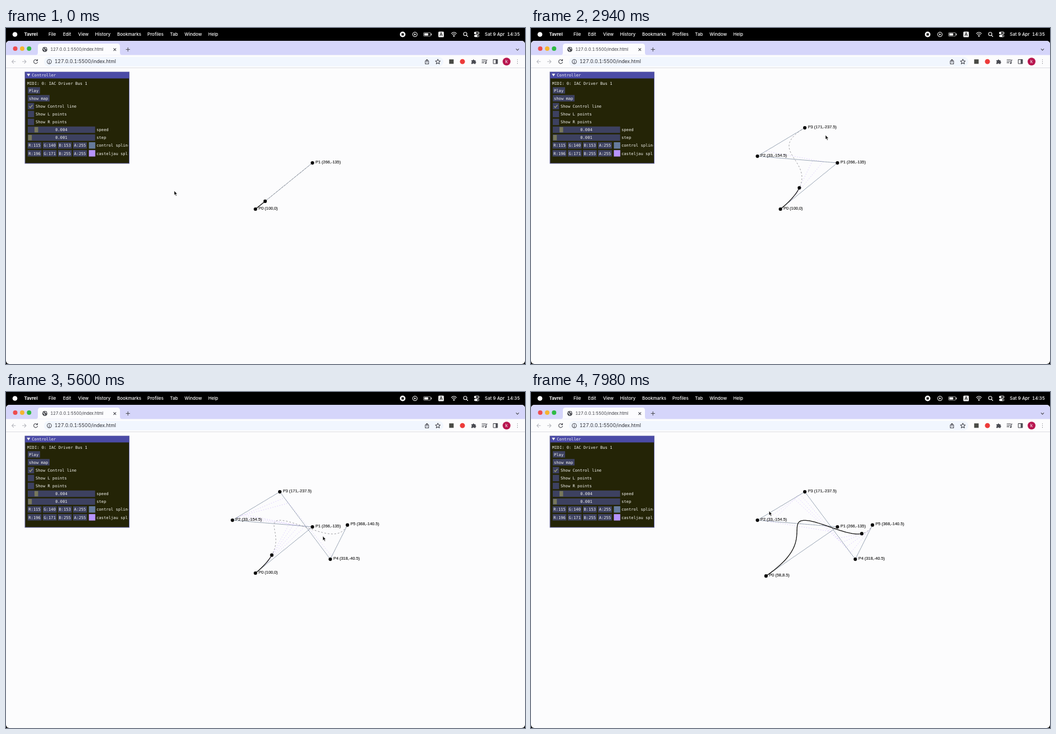
An HTML page that plays this animation: 929 by 603 pixels, repeating every 8 s.

```html
<!DOCTYPE html>
<html lang="en">
<head>
<meta charset="utf-8">
<title>Bezier controller</title>
<style>
  html, body { margin: 0; width: 100%; height: 100%; overflow: hidden; background: #000; }
  svg { display: block; width: 100%; height: 100%; }
  text { font-family: Inter, sans-serif; font-variant-numeric: tabular-nums; }
  .menu text { font-size: 8px; font-weight: 500; fill: #fff; }
  .menu .app { font-weight: 700; }
  .icon { fill: none; stroke: #4a4b52; stroke-width: 1.1; stroke-linecap: round; stroke-linejoin: round; }
  .menu .icon { stroke: #fff; }
  .panel text { font: 7.15px "DejaVu Sans Mono", monospace; fill: #f4f4f0; }
  .panel .mid { text-anchor: middle; }
  .field { fill: #3d4160; }
  .grab { fill: #77775c; }
  .label { font: 7.4px "Liberation Sans", Arial, sans-serif; fill: #111; stroke: #111; stroke-width: .12; }
  .plot path { fill: none; }
  #control { stroke: #4c617c; stroke-width: 1; stroke-dasharray: 1.4 1.1; }
  #guide { stroke: #85858a; stroke-width: .8; stroke-dasharray: 3 3; }
  #hull { stroke: #c4abff; stroke-width: .7; stroke-dasharray: 1.3 3; }
  #drawn { stroke: #151513; stroke-width: 1.3; }
</style>
</head>
<body>
<svg viewBox="0 0 929 603" preserveAspectRatio="none">
  <defs>
    <clipPath id="panelClip"><rect x="34" y="79" width="184.5" height="164"/></clipPath>
    <clipPath id="windowClip"><rect y="23" width="929" height="580" rx="6"/></clipPath>
  </defs>
  <rect width="929" height="603"/>

  <g class="menu">
    <circle cx="16" cy="11.5" r="4.3" fill="#fff"/>
    <g id="menuText"></g>
    <circle cx="710" cy="11.5" r="5" fill="#fff"/>
    <rect x="708" y="9.5" width="4" height="4"/>
    <circle class="icon" cx="732" cy="11.5" r="4"/>
    <path d="M730.8 9.5l3.2 2-3.2 2z" fill="#fff"/>
    <rect class="icon" x="747.5" y="8.3" width="12.5" height="6.4" rx="1.8" stroke-opacity=".6"/>
    <rect x="748.8" y="9.6" width="7" height="3.8" rx=".7" fill="#fff"/>
    <path d="M761.3 10.3v2.4" class="icon"/>
    <rect x="773.8" y="6.5" width="10" height="10" rx="1.5" fill="#eee"/>
    <text x="778.8" y="14.4" text-anchor="middle" style="fill:#111">A</text>
    <path class="icon" d="M797.3 9.8q4.5-4 9 0M799 11.9q2.8-2.4 5.6 0" stroke-width="1.5"/>
    <circle cx="801.8" cy="14.2" r="1.3" fill="#fff"/>
    <circle class="icon" cx="822" cy="10.8" r="3"/>
    <path class="icon" d="M824.3 13.1l2.3 2.4"/>
    <rect class="icon" x="838.3" y="7.3" width="8.4" height="3.4" rx="1.7"/>
    <rect x="838" y="12.2" width="9" height="4" rx="2" fill="#fff"/>
    <circle cx="840.2" cy="9" r="1.4" fill="#fff"/>
    <circle cx="844.9" cy="14.2" r="1.3"/>
  </g>

  <g clip-path="url(#windowClip)">
    <rect y="23" width="929" height="580" fill="#fcfcfd"/>
    <rect y="23" width="929" height="25.5" fill="#d5d5fa"/>
    <path d="M53 48.5q4 0 4-4V33q0-5 5-5H199q5 0 5 5V44.5q0 4 4 4z" fill="#fcfcfe"/>
    <circle cx="16.5" cy="37" r="4" fill="#ee4c4f"/>
    <circle cx="29" cy="37" r="4" fill="#f5b530"/>
    <circle cx="41.3" cy="37" r="4" fill="#2fbb45"/>
    <circle cx="69.5" cy="38.5" r="4.5" fill="#4a4b52"/>
    <path d="M66.5 37.2l2 1.5 1 2.5M70 35l.5 2 2.5.5" class="icon" style="stroke:#fcfcfe"/>
    <text x="79.5" y="41.2" font-size="7.4" fill="#3c3d44">127.0.0.1:5500/index.html</text>
    <path class="icon" d="M192.7 36.7l4 4m0-4l-4 4M215 38.5h6.5m-3.25-3.25v6.5M913.2 37.7l2.3 2.3 2.3-2.3"/>

    <path d="M0 71.5H929" stroke="#dddde2"/>
    <rect x="68" y="52" width="715" height="17" rx="8.5" fill="#f1f6fe"/>
    <path class="icon" d="M17 60.3H10.5l3-3m-3 3l3 3M29.5 60.3H36l-3-3m3 3l-3 3" style="stroke:#b5b6bd"/>
    <path class="icon" d="M56 58.3a3.5 3.5 0 1 0 .5 3M56.5 56.3v2.3h-2.5"/>
    <circle class="icon" cx="77.5" cy="60.3" r="3.8"/>
    <path class="icon" d="M77.5 60v2.2M77.5 58.4v.1"/>
    <text x="87" y="63.4" font-size="8.6" fill="#2b2c32">127.0.0.1:5500/index.html</text>
    <path class="icon" d="M752 59h-1.5v5.5h6V59H755M753.5 62v-5.5l-1.7 1.7m1.7-1.7l1.7 1.7"/>
    <path class="icon" d="M773 56l1.3 2.9 3.1.3-2.3 2.1.7 3.1-2.8-1.6-2.8 1.6.7-3.1-2.3-2.1 3.1-.3z"/>
    <rect x="793.3" y="56.3" width="8" height="8" fill="#494a45"/>
    <circle cx="817" cy="60.3" r="4.5" fill="#ed3b39"/>
    <path d="M833 58h2.3a1.5 1.5 0 0 1 3 0h2.2v2.3a1.4 1.4 0 0 1 0 2.7v1.5H838a1.4 1.4 0 0 0-2.7 0H833V62a1.4 1.4 0 0 0 0-2.6z" fill="#4a4b52"/>
    <path class="icon" d="M852 57h6.5M852 59.7h6.5M852 62.4h3.5M859.7 63v-5.5h1.5"/>
    <circle cx="858.7" cy="63" r="1.4" fill="#4a4b52"/>
    <rect class="icon" x="872.2" y="56.6" width="7.6" height="7.4" rx=".5"/>
    <rect x="876.5" y="56.6" width="3.3" height="7.4" fill="#4a4b52"/>
    <circle cx="896" cy="60.3" r="7" fill="#b81750"/>
    <text x="896" y="63" font-size="8" text-anchor="middle" fill="#fff">k</text>
    <path class="icon" d="M915.5 57v.01M915.5 60.3v.01M915.5 63.6v.01" stroke-width="1.8"/>

    <g class="panel">
      <rect x="34" y="79" width="186.5" height="164" fill="#242406" stroke="#6464a4" stroke-width="1"/>
      <rect x="34.5" y="79" width="185.5" height="11.5" fill="#4b4ba6"/>
      <path d="M37.3 82h6l-3 5z" fill="#f4f4f0"/>
      <g id="panelBody" clip-path="url(#panelClip)"></g>
      <path d="M41.5 140.5l2 2.5 4-5" fill="none" stroke="#9b9b75" stroke-width="1.3"/>
    </g>

    <g class="plot">
      <path id="hull"/>
      <path id="control"/>
      <path id="guide"/>
      <path id="drawn"/>
      <g id="points"></g>
      <circle id="runner" r="3.1" fill="#0c0c0c"/>
    </g>
    <path id="cursor" d="M0 0V8l1.8-1.6 1.3 3 1.5-.6-1.3-2.9H5.7z" fill="#0a0a0a" stroke="#fff" stroke-width=".7"/>
  </g>
</svg>
<script>
const $ = id => document.getElementById(id);

function add(parent, tag, attrs, content = '') {
  const el = document.createElementNS('http://www.w3.org/2000/svg', tag);
  for (const key in attrs) el.setAttribute(key, attrs[key]);
  el.textContent = content;
  return parent.appendChild(el);
}

// Menu bar
[['Tavrel', 32.5], ['File', 76], ['Edit', 102], ['View', 129], ['History', 159.5],
 ['Bookmarks', 199], ['Profiles', 253], ['Tab', 293.5], ['Window', 319.5], ['Help', 362],
 ['Sat 9 Apr', 857], ['14:35', 897]].forEach(([word, x], i) =>
  add($('menuText'), 'text', { x, y: 14.3, class: i ? '' : 'app' }, word));

// Controller panel
const body = $('panelBody');
const say = (x, y, words, cls = '') => add(body, 'text', { x, y, class: cls }, words);
const box = (x, y, width, height = 11.5, cls = 'field') =>
  add(body, 'rect', { x, y, width, height, class: cls });

say(46.3, 87.3, 'Controller');
say(38, 102, 'MIDI: 0: IAC Driver Bus 1');
box(39, 106.2, 22); say(41, 114.6, 'Play');
box(39, 120.3, 39); say(41, 128.7, 'show map');
['Control line', 'L points', 'R points'].forEach((name, i) => {
  box(39, 134.5 + i * 14.15, 11.3);
  say(53, 142.8 + i * 14.15, 'Show ' + name);
});
[['speed', '0.004', 51], ['step', '0.001', 39.7]].forEach(([name, value, grab], i) => {
  const y = 176.8 + i * 14.15;
  box(39, y, 120.5);
  box(grab, y + 1, 6.5, 9.5, 'grab');
  say(99, y + 8.4, value, 'mid');
  say(162, y + 8.4, name);
});
[['control spline', [115, 140, 153], '#667b9d'],
 ['casteljau spline', [196, 171, 255], '#b794ff']].forEach(([name, rgb, fill], row) => {
  const y = 205 + row * 14.15;
  [...rgb, 255].forEach((value, i) => {
    box(38.7 + i * 27.1, y, 24.8);
    say(51.1 + i * 27.1, y + 8.4, 'RGBA'[i] + ':' + value, 'mid');
  });
  box(148.3, y, 11.5).style.fill = fill;
  say(162, y + 8.4, name);
});

// Control points in plot units, with the step at which each appears
const points = [
  { x: 100, y: 0, from: 0 }, { x: 266, y: -135, from: 0 },
  { x: 33, y: -154.5, from: 42 }, { x: 171, y: -237.5, from: 54 },
  { x: 318, y: -40.5, from: 104 }, { x: 368, y: -140.5, from: 112 }
];
for (const p of points) {
  p.dot = add($('points'), 'circle', { r: 3.1, fill: '#0c0c0c' });
  p.label = add($('points'), 'text', { class: 'label' });
}

// Pointer stops: step, x, y
const stops = [
  [0, 301, 292], [21, 348, 350], [29, 379, 331], [41, 405, 230], [45, 405, 230],
  [53, 490, 179], [56, 490, 179], [63, 527, 192], [99, 587.5, 299.5], [103, 580.4, 300],
  [106, 580.4, 300], [111, 611, 238.6], [114, 611, 238.6], [120, 567, 258.5],
  [136, 446, 325], [143, 443.5, 326.5], [147, 446, 325], [158, 420.6, 330.2],
  [162, 420.6, 330.2], [171, 426, 213.5]
];

const mix = (a, b, t) => a + (b - a) * t;
const ease = t => t * t * (3 - 2 * t);
const clamp = t => Math.min(1, Math.max(0, t));
const line = pts => 'M' + pts.map(p => p[0].toFixed(2) + ' ' + p[1].toFixed(2)).join('L');
const toStage = (x, y) => [385.05 + x * .6145, 325 + y * .6145];

function casteljau(pts, t) {
  const levels = [];
  while (pts.length > 1) {
    pts = pts.slice(1).map((q, i) => [mix(pts[i][0], q[0], t), mix(pts[i][1], q[1], t)]);
    levels.push(pts);
  }
  return { levels, end: pts[0] };
}

function curve(pts, last) {
  const count = Math.max(2, Math.ceil(last * 80));
  return line(Array.from({ length: count + 1 }, (_, i) => casteljau(pts, last * i / count).end));
}

function pointerAt(step) {
  const i = Math.max(1, stops.findIndex(s => s[0] >= step));
  const [a, b] = [stops[i - 1], stops[i]];
  const t = ease((step - a[0]) / (b[0] - a[0]));
  return [mix(a[1], b[1], t), mix(a[2], b[2], t)];
}

function render(step) {
  const t = (.17 + .016 * step) % 1;
  const drag = ease(clamp((step - 147) / 11));
  points[0].x = Math.round(mix(100, 58, drag));
  points[0].y = Math.round(mix(0, 8.5, drag) * 2) / 2;

  const shown = [];
  points.forEach((p, i) => {
    const visible = step >= p.from;
    const [x, y] = toStage(p.x, p.y);
    p.dot.style.display = p.label.style.display = visible ? '' : 'none';
    p.dot.setAttribute('cx', x);
    p.dot.setAttribute('cy', y);
    p.label.setAttribute('x', x + 5.5);
    p.label.setAttribute('y', y + .6);
    p.label.textContent = `P${i} (${p.x},${p.y})`;
    if (visible) shown.push([x, y]);
  });

  const { levels, end } = casteljau(shown, t);
  $('control').setAttribute('d', line(shown));
  $('hull').setAttribute('d', levels.filter(l => l.length > 1).map(line).join(''));
  $('guide').setAttribute('d', curve(shown, 1));
  $('drawn').setAttribute('d', curve(shown, t));
  $('runner').setAttribute('cx', end[0]);
  $('runner').setAttribute('cy', end[1]);
  $('cursor').setAttribute('transform', `translate(${pointerAt(step)})`);
}

// Three steps every 140 ms, held for 20, 20 and 100 ms
function stepAt(ms) {
  const rest = ms % 140;
  return Math.floor(ms / 140) * 3 + (rest < 20 ? 0 : rest < 40 ? 1 : 2);
}

const start = performance.now();
let current = -1;
function tick() {
  const step = stepAt((performance.now() - start) % 8000);
  if (step !== current) render(current = step);
  requestAnimationFrame(tick);
}
tick();
</script>
</body>
</html>
```
